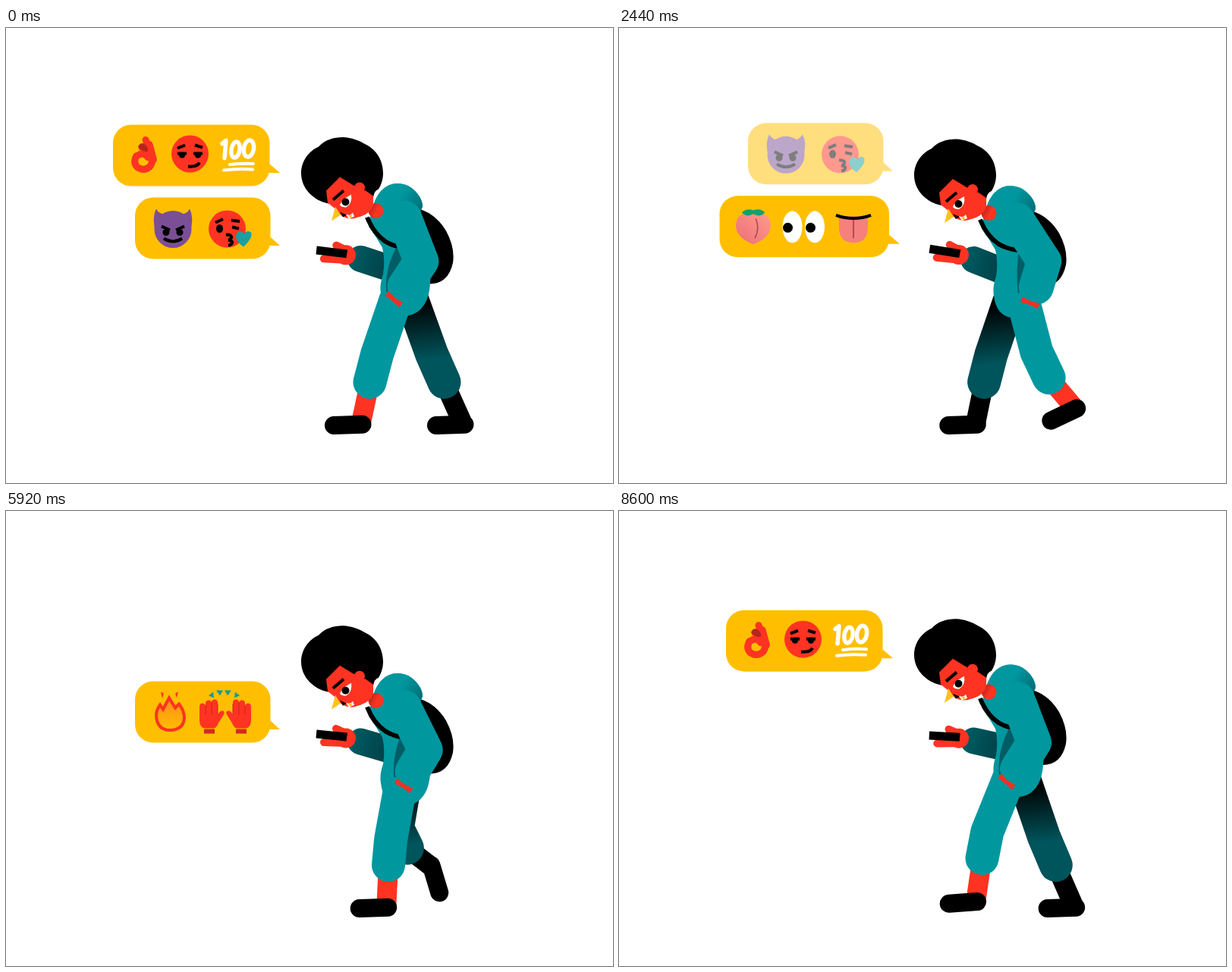
An HTML page for the animation above (8.64 s loop, 800 px wide and 600 px high).

```html
<!DOCTYPE html>
<html lang="en">
<head>
<meta charset="utf-8">
<title>Walking and texting</title>
<style>
html, body { margin: 0; height: 100%; overflow: hidden; background: #fff; }
svg { display: block; }
.line { fill: none; stroke-linecap: round; stroke-linejoin: round; }
.ink { fill: none; stroke: #000; stroke-width: 4; }
.red { fill: #ff3322; }
.redLine { fill: none; stroke: #ff3322; stroke-linecap: round; stroke-linejoin: round; }
.teal { fill: #00979f; }
.bubble { fill: #ffbf00; }
.shoe { stroke: #000; stroke-width: 24; }
.shin { stroke-width: 26; stroke-linecap: butt; }
.cloth { stroke-width: 44; }
</style>
</head>
<body>
<svg width="800" height="600" viewBox="0 0 800 600">
  <defs>
    <linearGradient id="farCloth" gradientUnits="userSpaceOnUse" x1="515" y1="364" x2="523" y2="440">
      <stop stop-color="#000"/><stop offset="1" stop-color="#00545b"/>
    </linearGradient>
    <linearGradient id="farSleeve" gradientUnits="userSpaceOnUse" x1="455" y1="300" x2="502" y2="310">
      <stop stop-color="#005c63"/><stop offset="1" stop-color="#004248"/>
    </linearGradient>
    <linearGradient id="hoodShade" gradientUnits="userSpaceOnUse" x1="520" y1="222" x2="550" y2="242">
      <stop stop-color="#00979f"/><stop offset="1" stop-color="#006a72"/>
    </linearGradient>
    <linearGradient id="neckShade" gradientUnits="userSpaceOnUse" x1="476" y1="236" x2="494" y2="246">
      <stop stop-color="#9c2219"/><stop offset=".7" stop-color="#ff3322"/>
    </linearGradient>
    <linearGradient id="peachSkin" x1="0" y1="1" x2="1" y2="0">
      <stop stop-color="#ec6f76"/><stop offset="1" stop-color="#ff9a8c"/>
    </linearGradient>
    <linearGradient id="flame" x1="0" y1="0" x2="0" y2="1">
      <stop stop-color="#ff8a1c"/><stop offset="1" stop-color="#ffbf00"/>
    </linearGradient>
    <path id="horn" d="M197 44Q192 27 198 15 202 23 213 22L208 36z" fill="#7b4f96"/>
    <g id="palm">
      <path class="red" d="M255 54V34q0-5 4-5 3 0 4 4v-5q1-3 4-3t4 3v-1q1-3 4-3t4 3v17q3-6 7-5 3 2 1 5l-7 11q-2 6-6 7h-13q-6-2-6-11z"/>
      <path d="M263 31v13M271 28v16M279 30v14" fill="none" stroke="#c7271b"/>
      <path d="M261 63h14v6h-14z" fill="#d32a1d"/>
    </g>
  </defs>

  <g class="message">
    <rect class="bubble" x="170" width="178.500" height="81" rx="24"/>
    <path class="bubble" d="M344 48L361 63.500H340z"/>
    <use href="#horn"/><use href="#horn" transform="matrix(-1 0 0 1 440 0)"/>
    <circle cx="220" cy="42" r="24.500" fill="#7b4f96"/>
    <path class="ink" d="M205 38L216 43M235 38L224 43M208 54Q220 62 232 54"/>
    <circle cx="211" cy="46" r="4.500"/><circle cx="229" cy="46" r="4.500"/>
    <circle class="red" cx="291.500" cy="41.500" r="24.500"/>
    <path class="ink" d="M276 33L286 28.500M297 30L308 31.500M298 39L307 41M290 49q8 0 7 4-1 3-4 3 6 1 5 4-1 3-5 3"/>
    <ellipse cx="281.500" cy="41" rx="4.500" ry="5.500"/>
    <path d="M313 65Q303 58 303 51 304 44 310 45 313 46 314 48 318 42 323 46 326 53 313 65z" fill="#1aa09f"/>
  </g>

  <g class="message">
    <rect class="bubble" x="132.500" width="223.500" height="81" rx="24"/>
    <path class="bubble" d="M352 48L370 63.500H348z"/>
    <path d="M177 64Q154 55 154 39 155 24 168 23 174 23 177 25 182 22 190 24 200 28 200 39 200 55 177 64z" fill="url(#peachSkin)"/>
    <path d="M180 30Q186 42 179 56" fill="none" stroke="#a84750" stroke-width="1.500"/>
    <path d="M162 22Q168 16 177 19 187 16 192 22 187 29 177 24 168 29 162 22z" fill="#14a06f"/>
    <ellipse cx="228.500" cy="41" rx="13" ry="21" fill="#fff"/><ellipse cx="258" cy="41" rx="13" ry="21" fill="#fff"/>
    <circle cx="222.500" cy="42" r="6.500"/><circle cx="252.500" cy="42" r="6.500"/>
    <path d="M290 27H328V43Q327 62 309 62T290 43z" fill="#f5807e"/>
    <path d="M309 32V56" stroke="#b34b50" stroke-width="2"/>
    <path class="ink" d="M286 25.500Q309 34 332 25.500"/>
  </g>

  <g class="message">
    <rect class="bubble" x="170" width="178.500" height="81" rx="24"/>
    <path class="bubble" d="M344 48L361 63.500H340z"/>
    <path d="M198 45Q198 38 203 31L207 37 215 22 223 35 228 30Q235 39 235 48 234 64 216 64.500 199 64 198 45z" fill="url(#flame)" stroke="#ff3322" stroke-width="4"/>
    <path class="red" d="M204 14L208 16 206 23zM227 14L223 16 225 22z"/>
    <use href="#palm"/><use href="#palm" transform="matrix(-1 0 0 1 578 0)"/>
    <path d="M267 19L273 14 274 22zM277 12H286L282 19zM288 12H297L292 19zM301 22L302 14 308 19z" fill="#1a9a93"/>
  </g>

  <g class="message">
    <rect class="bubble" x="141" width="206.500" height="81" rx="24"/>
    <path class="bubble" d="M343 48L361 63.500H339z"/>
    <path class="redLine" stroke-width="9" d="M184 20L190 34 194 47M189 26L194.500 46M172 41Q167 50 173 56 182 62 190 55 196 45 189 37L179 30M173 41Q181 35 187 43"/>
    <path d="M174 29Q178 22 183 26 188 30 187 35 180 37 174 29z" fill="#b4261b"/>
    <circle class="red" cx="242.500" cy="38.500" r="24.500"/>
    <path class="ink" d="M226 31L236 27M249 27L259 30M226 38H238M247 38H259M240 55Q252 56 255 50"/>
    <circle cx="232" cy="40" r="4"/><circle cx="253" cy="40" r="4"/>
    <g class="line" stroke="#fff" stroke-width="5.500">
      <path d="M285 25L290 21 288 44"/>
      <ellipse cx="302.500" cy="33" rx="5.500" ry="10.500" transform="rotate(10 302.500 33)"/>
      <ellipse cx="320" cy="31.500" rx="6.500" ry="11" transform="rotate(10 320 31.500)"/>
      <path stroke-width="4" d="M295 52.500Q311 50.500 326 51.500M287 60Q306 57.500 325 59"/>
    </g>
  </g>

  <g class="leg line">
    <path class="shin" stroke="#000"/><path class="shoe"/><path class="cloth" stroke="url(#farCloth)"/>
  </g>
  <path class="bob" d="M540 238Q565 243 580 268 592 290 589 310 583 338 558 338L535 330z"/>
  <path id="sleeve" class="line" stroke="url(#farSleeve)" stroke-width="35"/>
  <g id="hand">
    <path class="redLine" stroke-width="10" d="M435 287L448 293M419 305L446 306"/>
    <circle class="red" cx="448" cy="299.500" r="13"/>
    <path d="M409.500 288.500L450 292.500 448.500 303.500 408.500 299.500z"/>
  </g>
  <g class="bob">
    <path class="teal" d="M480 250L484 234Q492 210 510 206 530 203 543 220 549 228 549 236L546 243Q560 270 558 300 562 340 555 358 545 382 520 380 497 378 494 350 492 340 497 325 500 305 496 290 488 276 478 262z"/>
    <path d="M510 206Q530 203 543 220 549 228 549 236L546 243 520 235z" fill="url(#hoodShade)"/>
    <path d="M476 250Q484 271 500 282 513 290 532 291" fill="none" stroke="#000" stroke-width="6"/>
    <circle cx="487.500" cy="241.500" r="10" fill="url(#neckShade)"/>
  </g>
  <g class="leg line">
    <path class="shin" stroke="#ff3322"/><path class="shoe"/><path class="cloth" stroke="#00979f"/>
  </g>
  <g class="bob">
    <path id="armShade" fill="#005d65"/>
    <path id="arm" class="line" stroke="#00979f" stroke-width="46"/>
    <path id="cuff" d="M-12 -4Q0 -1 12 -4L12 4Q0 2 -12 4z" fill="#ee3123"/>
  </g>
  <g id="head">
    <path d="M412 157C420 148 432 144.500 444 144.500C455 145 466 149 472 153C488 160 497 175 497 192C497 201 494 208 491 213Q485 215 484 224L474 228 425 232C405 228 389 212 389 192C389 176 399 163 412 157z"/>
    <path class="red" d="M440 197L422 215 424 231 434 239 441 247Q452 255 464 250 480 246 484 234L484 222 474 215 458 208z"/>
    <circle class="red" cx="466" cy="211" r="7"/>
    <path d="M440 234Q442 227 455 220 457 232 448 237 442 237 440 234z" fill="#fff"/>
    <circle cx="447.500" cy="230" r="5"/>
    <path class="ink" d="M431 227L445 215"/>
    <path d="M440 243L449 247 444 250z"/>
    <path d="M448 246Q454 249 457 244L459 249 452 252z" fill="#fff"/>
    <path d="M451 248L456 247 455 252z" fill="#ffbf00"/>
    <path d="M434 236L441 247 429 255z" fill="#ffc21a"/>
  </g>
</svg>
<script>
const LOOP = 8640, STRIDE = 960, STEP = STRIDE / 2, TICK = 40, SLOT = LOOP / 4;
const $ = q => document.querySelector(q), $$ = q => [...document.querySelectorAll(q)];
const messages = $$('.message'), legs = $$('.leg'), bobbing = $$('.bob');

const { sin, cos, PI } = Math;
const mix = (a, b, k) => a + (b - a) * k;
const clamp = v => Math.min(1, Math.max(0, v));
const wave = (t, peak, period) => cos(2 * PI * (t - peak) / period);
const set = (el, name, value) => el.setAttribute(name, value);
const shift = (el, y) => set(el, 'transform', `translate(0 ${y})`);

// t = 0 is the front contact; the foot stands for one step, then swings for one
function drawLeg(leg, t, bob) {
  const fore = wave(t, 0, STRIDE);
  const u = clamp((t - STEP) / STEP), lift = sin(PI * u);
  const hip = 524.5 - 10.5 * fore - 6 * lift, hipY = 358 + bob;
  const ankle = 528.5 - 49 * fore - 38 * lift * (1 - .8 * u);
  const ankleY = 467 - 30 * lift * (.7 + .5 * u);
  const knee = mix(hip, ankle, .66) - 2 - 11 * lift, kneeY = mix(hipY, ankleY, .66);
  const toe = 499.5 - 67.5 * fore + 76 * lift ** 2 * (1 - u), toeY = 524 - 24 * lift;
  const pitch = (-2 - 195 * lift ** 1.5 * (1 - u)) * PI / 180;
  const sole = d => `${toe + d * cos(pitch)} ${toeY + d * sin(pitch)}`;
  const [shin, shoe, cloth] = leg.children;
  set(shin, 'd', `M${ankle} ${ankleY}L${sole(35.5)}`);
  set(shoe, 'd', `M${toe} ${toeY}L${sole(37.5)}`);
  set(cloth, 'd', `M${hip} ${hipY}L${knee} ${kneeY}L${ankle} ${ankleY}`);
}

function drawArm(t, bob) {
  const s = ((1 + wave(t, 400, STRIDE)) / 2) ** 1.6;
  const ex = mix(547, 564, s), ey = mix(308, 304, s);
  const wx = mix(525, 557, s), wy = 341 - bob * .7;
  const tilt = mix(40, 16, s), a = tilt * PI / 180;
  set($('#arm'), 'd', `M525 251L${ex} ${ey}L${wx} ${wy}`);
  set($('#armShade'), 'd', `M${ex - 33} ${ey - 18}Q${wx - 27} 320 ${wx - 24} ${wy + 8}L${wx} ${wy}L${ex} ${ey}z`);
  set($('#cuff'), 'transform', `translate(${wx - 22 * sin(a)} ${wy + 22 * cos(a)}) rotate(${tilt})`);
}

// a message waits below, slides up for the next one and fades there
function drawMessage(el, age, top) {
  const k = clamp((age - SLOT + 200) / 160);
  shift(el, top - 96 * k * k * (3 - 2 * k));
  set(el, 'opacity', clamp(1 - (age - SLOT) / 560));
}

function frame() {
  const t = Math.floor((performance.now() - start) % LOOP / TICK) * TICK;
  const bob = 2.2 + 6.2 * wave(t, 155, STEP);
  const top = 227.3 - 6.6 * wave(t, 73, STEP);
  const turn = (224.5 - top) * 1.1;
  messages.forEach((m, n) => drawMessage(m, (t - n * SLOT + LOOP) % LOOP, top));
  drawLeg(legs[0], (t + STEP) % STRIDE, bob);
  drawLeg(legs[1], t % STRIDE, bob);
  bobbing.forEach(el => shift(el, bob));
  shift($('#head'), bob * .8);
  set($('#hand'), 'transform', `rotate(${turn} 455 299)`);
  set($('#sleeve'), 'd', `M467.5 ${304 + turn * .4}L505 ${315 + turn * 1.5}`);
  drawArm(t, bob);
  requestAnimationFrame(frame);
}

const start = performance.now();
frame();
</script>
</body>
</html>
```
